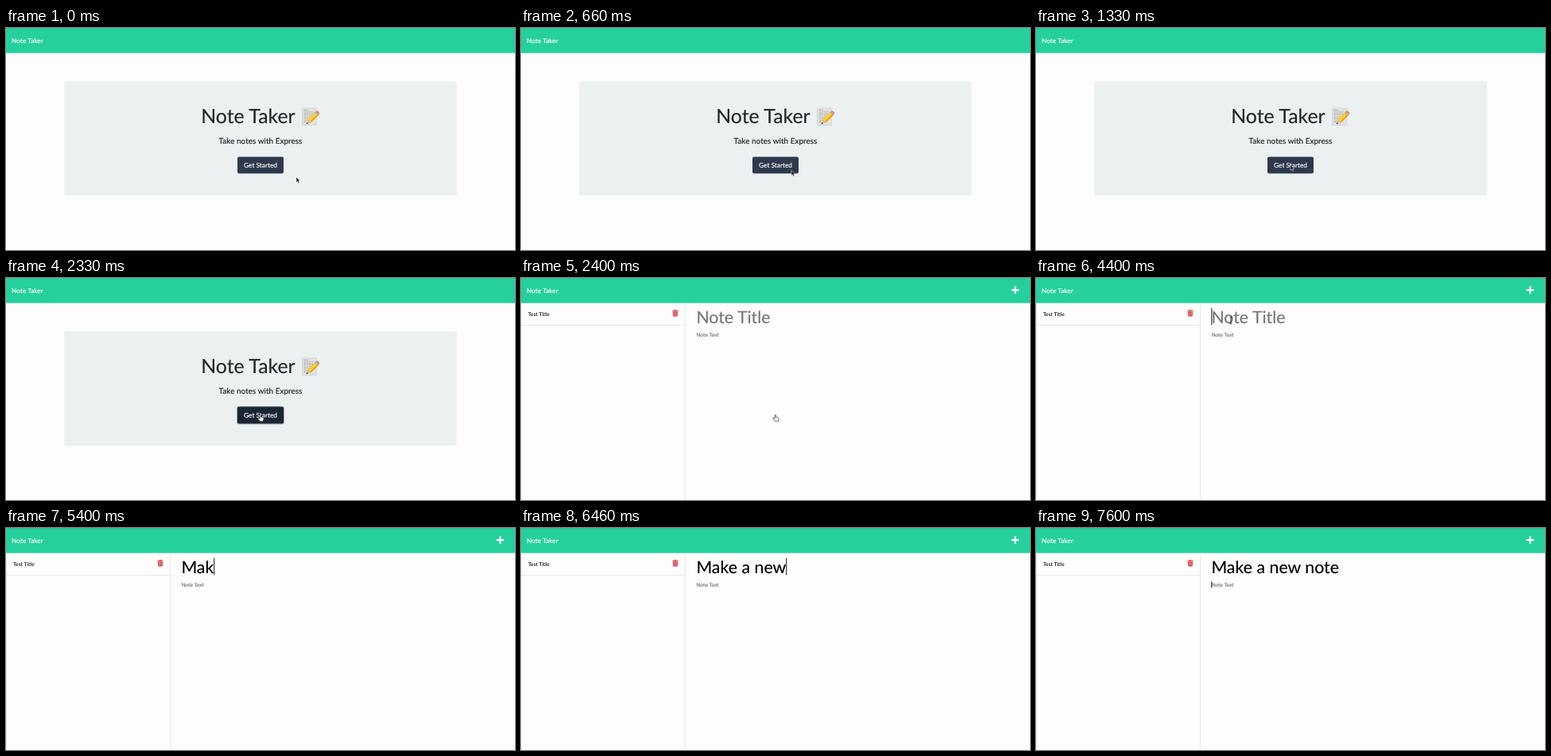
Write an HTML page that moves like this. It is 640x280 px and loops after 8 s.

```html
<!DOCTYPE html>
<html lang="en">
<head>
<meta charset="utf-8">
<title>Note Taker</title>
<style>
  html, body { margin: 0; height: 100%; overflow: hidden; background: #fdfdfd; }
  svg { display: block; width: 640px; height: 280px; }
  text {
    font: 6.67px Lato, sans-serif; white-space: pre; text-rendering: geometricPrecision;
    fill: #212529; stroke: #212529; stroke-width: .15;
  }
  .brand { font-size: 8.33px; fill: #fff; stroke: #fff; }
  .hint { fill: #757575; stroke: #757575; }
  .title { font-size: 21.33px; }
  .item { font-weight: 700; fill: #2c2e30; stroke: none; }
  .lead { font-size: 10px; }
  .heading { font-size: 24.89px; }
  #typed { fill: #000; stroke: #000; }
</style>
</head>
<body>
<svg viewBox="0 0 640 280">
  <rect width="640" height="280" fill="#fdfdfd"/>
  <rect width="640" height="31.6" fill="#25d09c"/>
  <rect width="640" height=".8" fill="#45b694"/>
  <text class="brand" x="7.1" y="18.6">Note Taker</text>

  <g id="home">
    <rect x="73.3" y="67.4" width="493.4" height="144" rx="2" fill="#ebf0f0"/>
    <text class="heading" x="245.200" y="119.900">Note Taker</text>
    <g id="memo">
      <path d="M372.500 101h17.800v21.500h-17.800z" fill="#e3e4e2" stroke="#c6c8c6" stroke-width=".6"/>
      <path d="M374.500 103.500h6M374.500 106h13M374.500 108.500h13M374.500 111h9M374.500 113.500h7M374.500 116h5M374.500 118.500h4"
            stroke="#999c9c" stroke-width=".9" stroke-dasharray="3 .6 1.800 .6"/>
      <path d="M377.500 121.200l2-6 4.200 4z" fill="#e0bd92"/>
      <path d="M377.500 121.200l.8-2.300 1.600 1.500z" fill="#333"/>
      <path d="M379.500 115.200l9.300-9.300 4.200 4-9.300 9.300z" fill="#e8a31f"/>
      <path d="M379.500 115.200l9.300-9.300 2.800 2.700-9.300 9.300z" fill="#fbcf3a"/>
      <path d="M388.200 106.500l1.400-1.400 4.200 4-1.400 1.400z" fill="#a9adae"/>
      <path d="M389.600 105.100q1.600-1.500 3.500.3t.7 3.700z" fill="#dd8075"/>
    </g>
    <text class="lead" x="320" y="146" text-anchor="middle">Take notes with Express</text>
    <rect id="ring" x="290.2" y="161.7" width="59.600" height="22.700" rx="3" fill="#8b95a1"/>
    <rect id="button" x="291" y="162.600" width="58" height="20.900" rx="2"/>
    <text class="brand" x="320" y="176" text-anchor="middle">Get Started</text>
  </g>

  <g id="notes">
    <path d="M.4 31.600v249M206.600 31.600v249M0 59.400h206.600" stroke="#e0e3e3" stroke-width=".8"/>
    <path d="M621.400 10.400v9.400M616.700 15.100h9.400" stroke="#fff" stroke-width="2.2"/>
    <text class="item" x="8.900" y="48">Test Title</text>
    <g fill="#dc4450" transform="translate(0 -.5)">
      <path d="M190.300 41.200h2.100l.6-.8h2l.6.8h2.100v1h-7.400zM190.800 42.700h6.400l-.4 5.500q0 .7-.7.7h-4.200q-.7 0-.7-.7z"/>
      <path d="M192.500 43.800v4M194 43.800v4M195.500 43.800v4" stroke="#f3b6ba" stroke-width=".5"/>
    </g>
    <text id="hint" class="title hint" x="220.400" y="56.800">Note Title</text>
    <text id="typed" class="title" x="220.400" y="56.800"></text>
    <text class="hint" x="220.400" y="73.900">Note Text</text>
    <rect id="caret" width=".9"/>
  </g>

  <path id="arrow" d="M0 0v6.600l1.500-1.400 1.100 2.500 1.200-.5-1.100-2.400h2z"
        fill="#111" stroke="#fff" stroke-width=".5"/>
  <path id="hand" d="M-.9 .5q.1-.7.7-.7t.7.7v2.300q1-.5 1.300.3 1-.3 1.200.5 1.100-.2 1.100.9 0 1.800-.7 2.600v.9h-4.100q-.3-1-1.200-1.900-.8-1-1.200-1.700 0-.9.9-.7l1.300.8z"
        fill="#fff" stroke="#222" stroke-width=".65" stroke-linejoin="round"/>
  <g id="beam" fill="none">
    <path id="stem" d="M-1.800-4.600Q0-4.600 0-3.500Q0-4.600 1.800-4.600M0-3.500V3.500M-1.800 4.600Q0 4.600 0 3.500Q0 4.600 1.800 4.600"/>
  </g>
  <style>
    #beam { stroke: #222; stroke-width: .8; }
  </style>
</svg>
<script>
const LOOP = 8000, HOVER = 2000, PRESS = 2130, OPEN = 2400, FIELD = 2930, FOCUS = 4260, TAB = 7600;
const NOTE = 'Make a new note';
const keyTimes = [4866, 5200, 5400, 5530, 5660, 5860, 5930, 6200, 6330, 6460, 6530, 6800, 7000, 7060, 7260];
// Pointer stops: time, x, y
const stops = [[200, 365, 188], [1060, 320, 172.8], [2870, 320, 172.8],
  [3060, 267, 68], [3270, 267, 68], [3730, 245, 54], [4060, 245, 53.5]];

const $ = id => document.getElementById(id);
const clamp = v => Math.max(0, Math.min(1, v));
const show = (id, on) => $(id).style.display = on ? '' : 'none';
const mix = (a, b, k) => a.map((v, i) => v + (b[i] - v) * k);

function pointerAt(t) {
  let pos = stops[0].slice(1);
  for (let i = 1; i < stops.length; i++) {
    const [t0, ...from] = stops[i - 1], [t1, ...to] = stops[i];
    const k = clamp((t - t0) / (t1 - t0));
    if (t >= t0) pos = mix(from, to, k * k * (3 - 2 * k));
  }
  return pos;
}

function drawPointer(t) {
  const [x, y] = pointerAt(t);
  const kind = t >= keyTimes[0] ? '' : t >= FIELD ? 'beam' : t >= HOVER ? 'hand' : 'arrow';
  for (const id of ['arrow', 'hand', 'beam']) show(id, id === kind);
  if (kind) $(kind).setAttribute('transform', `translate(${x} ${y})`);
}

function drawCaret(t) {
  const inText = t >= TAB;
  const blinkOff = t >= 4800 && t < keyTimes[0];
  show('caret', t >= FOCUS && !blinkOff);
  const x = 220.4 + (inText ? 0 : $('typed').getComputedTextLength());
  const box = inText ? { x, y: 67.3, height: 8 } : { x, y: 37.8, height: 21.6 };
  for (const k in box) $('caret').setAttribute(k, box[k]);
}

function draw(now) {
  const t = now % LOOP;
  show('home', t < OPEN);
  show('notes', t >= OPEN);
  const press = clamp((t - PRESS) / 140);
  $('button').style.fill = `rgb(${mix([45, 57, 76], [27, 36, 51], press)})`;
  $('ring').style.opacity = press;
  const count = keyTimes.filter(k => t >= k).length;
  $('typed').textContent = NOTE.slice(0, count);
  show('hint', !count);
  drawCaret(t);
  drawPointer(t);
}

const start = performance.now();
function tick() {
  draw(performance.now() - start);
  requestAnimationFrame(tick);
}
tick();
</script>
</body>
</html>
```
